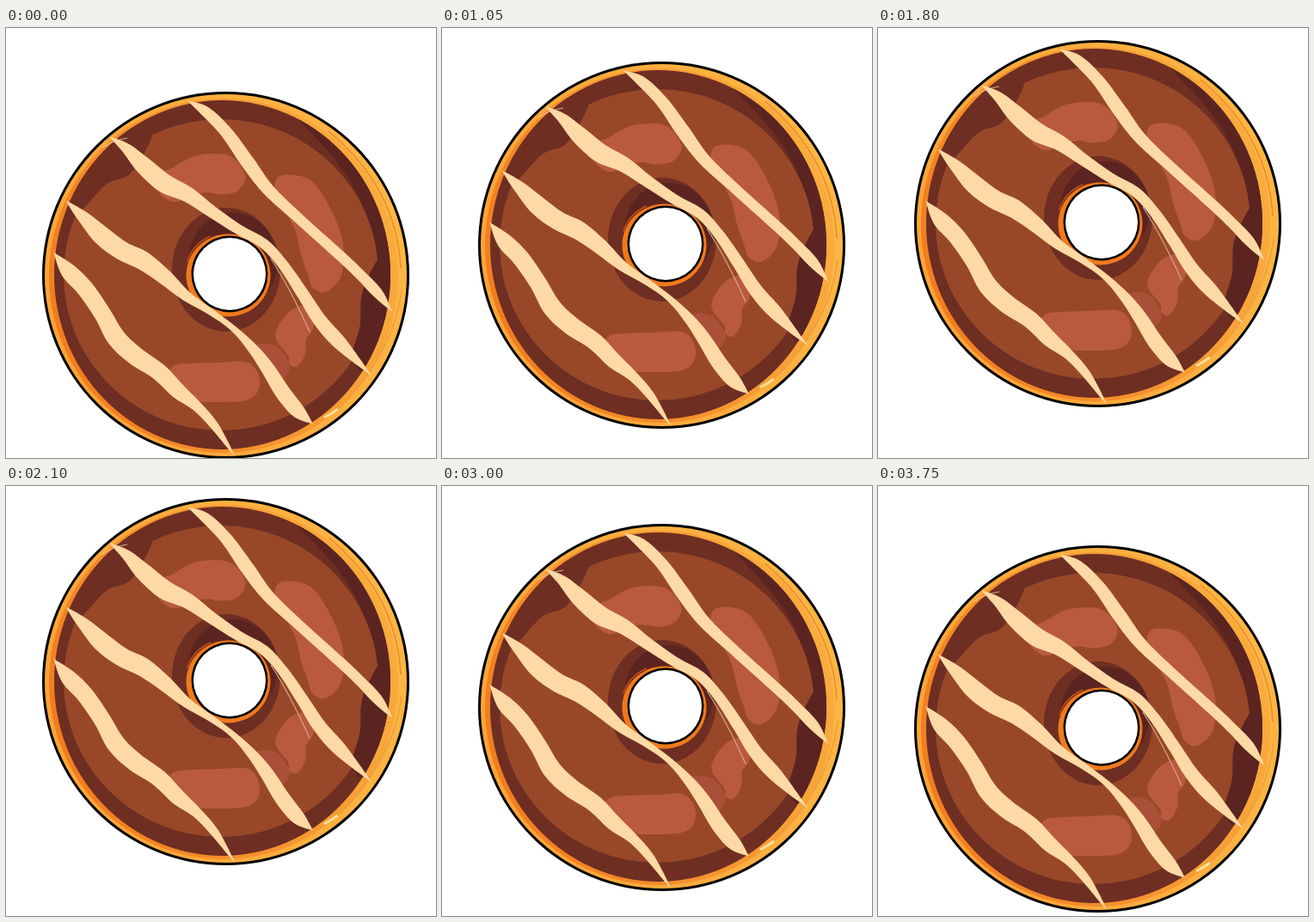
An HTML page with a canvas that plays this animation: 500 px wide and 500 px high, repeating every 3900 ms.

```html
<!DOCTYPE html>
<html lang="en">
<head>
<meta charset="utf-8">
<title>Bobbing doughnut</title>
<style>
html, body { margin: 0; width: 100%; height: 100%; overflow: hidden; background: #fff; }
canvas { display: block; width: 100vw; height: 100vh; }
</style>
</head>
<body>
<canvas id="stage" width="500" height="500"></canvas>
<script>
const ctx = document.getElementById('stage').getContext('2d');
const STEP_MS = 150, STEPS = 26, RISE = 5;
const CREAM = '#fcd9a5', MILK = '#984828', DARK = '#6e2e22', DEEP = '#5b2420';
const GLOW = '#b95a3f', DIM_GLOW = '#aa5038';

function oval(color, x, y, rx, ry = rx) {
  ctx.beginPath();
  ctx.ellipse(x, y, rx, ry, 0, 0, 2 * Math.PI);
  ctx.fillStyle = color;
  ctx.fill();
}

function curve(color, width, x0, y0, cx, cy, x1, y1) {
  ctx.beginPath();
  ctx.moveTo(x0, y0);
  ctx.quadraticCurveTo(cx, cy, x1, y1);
  ctx.strokeStyle = color;
  ctx.lineWidth = width;
  ctx.stroke();
}

// Smooth closed Catmull-Rom outline.
function fillSmooth(color, pts) {
  const at = i => pts[(i + pts.length) % pts.length];
  ctx.beginPath();
  ctx.moveTo(...at(0));
  for (let i = 0; i < pts.length; i++) {
    const [a, b, c, d] = [at(i - 1), at(i), at(i + 1), at(i + 2)];
    ctx.bezierCurveTo(b[0] + (c[0] - a[0]) / 6, b[1] + (c[1] - a[1]) / 6,
      c[0] - (d[0] - b[0]) / 6, c[1] - (d[1] - b[1]) / 6, c[0], c[1]);
  }
  ctx.fillStyle = color;
  ctx.fill();
}

// Band of varying thickness along key points [x, y, half width].
function ribbon(color, ...keys) {
  const side = sign => keys.map(([x, y, half], i) => {
    const [ax, ay] = keys[Math.max(0, i - 1)];
    const [bx, by] = keys[Math.min(keys.length - 1, i + 1)];
    const k = sign * half / Math.hypot(bx - ax, by - ay);
    return [x + (by - ay) * k, y - (bx - ax) * k];
  });
  fillSmooth(color, [...side(1), ...side(-1).reverse()]);
}

function shade(from, to) {
  const g = ctx.createLinearGradient(50, 330, 440, 200);
  g.addColorStop(0, from);
  g.addColorStop(1, to);
  return g;
}

function drawDough() {
  oval('#000', 255.5, 287.5, 213.5);
  oval(shade('#f9a437', '#fdb544'), 255.5, 287.5, 210.5);
  oval(shade('#f27c20', '#f9ac3e'), 253, 288, 203, 206);
  curve('#e98b2d', 1.5, 375, 120, 454, 185, 459, 279);
  curve('#e9a03c', 1.5, 460, 304, 451, 380, 383, 446);
  curve('#fde09a', 3, 370, 453, 379, 448, 386, 443);
}

function drawChocolate() {
  ctx.save();
  oval(DARK, 251.5, 287, 195.5, 203);
  ctx.clip();
  ribbon(DEEP, [340, 100, 4], [398, 150, 14], [432, 210, 15], [442, 280, 16],
    [432, 335, 20], [414, 392, 8]);
  oval(MILK, 250, 287, 183, 181);
  ribbon(DARK, [165, 118, 8], [130, 150, 24], [103, 170, 18], [76, 212, 8]);
  ribbon(DEEP, [436, 270, 4], [428, 310, 14], [425, 350, 14], [406, 385, 5]);
  ctx.restore();
}

function drawGlows() {
  ribbon(GLOW, [171, 174, 6], [192, 183, 19], [225, 170, 22], [255, 171, 23], [274, 180, 10]);
  ribbon(GLOW, [317, 178, 8], [338, 192, 22], [358, 225, 24], [368, 260, 25],
    [370, 288, 19], [364, 304, 8]);
  ribbon(DIM_GLOW, [292, 372, 5], [308, 380, 12], [318, 396, 12], [312, 408, 6]);
  ribbon(GLOW, [356, 325, 5], [343, 340, 17], [331, 360, 18], [338, 380, 10], [334, 392, 5]);
  ribbon(GLOW, [190, 403, 10], [210, 411, 21], [250, 412, 23], [280, 410, 22], [293, 408, 10]);
}

function drawHoleRim() {
  oval(DARK, 256, 281, 63, 72);
  oval(DEEP, 264, 271, 52, 56);
  oval('#f07a1c', 258.5, 287.5, 49, 48);
  curve('#c4500f', 1.5, 211, 272, 216, 252, 238, 242);
}

function drawIcing() {
  ribbon(CREAM, [214, 86, 1], [232, 97, 6], [256, 121, 7], [281, 156, 8], [305, 188, 7],
    [340, 221, 6], [390, 266, 6], [412, 287, 6], [432, 308, 6], [447, 327, 1]);
  ribbon(CREAM, [123, 128, 1], [140, 140, 6], [160, 160, 10], [185, 181, 11], [212, 194, 9],
    [240, 214, 7], [270, 234, 6], [300, 251, 6], [322, 275, 6], [345, 309, 7],
    [365, 340, 8], [388, 366, 8], [421, 400, 1]);
  ribbon(CREAM, [72, 203, 1], [90, 220, 7], [112, 242, 11], [135, 259, 11], [160, 271, 11],
    [185, 290, 9], [210, 312, 6], [238, 330, 4], [265, 350, 3.5], [288, 374, 6],
    [305, 397, 8], [322, 424, 9], [340, 446, 8], [355, 459, 1]);
  ribbon(CREAM, [57, 263, 1], [72, 282, 9], [92, 303, 10], [112, 332, 10], [128, 360, 11],
    [150, 381, 11], [178, 400, 10], [200, 422, 9], [222, 440, 6], [242, 462, 5], [263, 493, 1]);
  curve('#d9a78c', 1.2, 308, 268, 330, 302, 353, 353);
  curve('#eed6b7', 0.8, 112, 139, 126, 130, 141, 128);
}

function drawDoughnut() {
  drawDough();
  drawChocolate();
  drawGlows();
  drawHoleRim();
  drawIcing();
  oval('#000', 260, 286, 44.5);
  oval('#fff', 260, 286, 42);
}

const start = performance.now();
function frame(now) {
  const step = Math.floor(Math.max(0, now - start) / STEP_MS) % STEPS;
  const lift = RISE * Math.min(step, STEPS - step);
  ctx.fillStyle = '#fff';
  ctx.fillRect(0, 0, 500, 500);
  ctx.save();
  ctx.translate(0, -lift);
  drawDoughnut();
  ctx.restore();
  requestAnimationFrame(frame);
}
frame(start);
</script>
</body>
</html>
```
